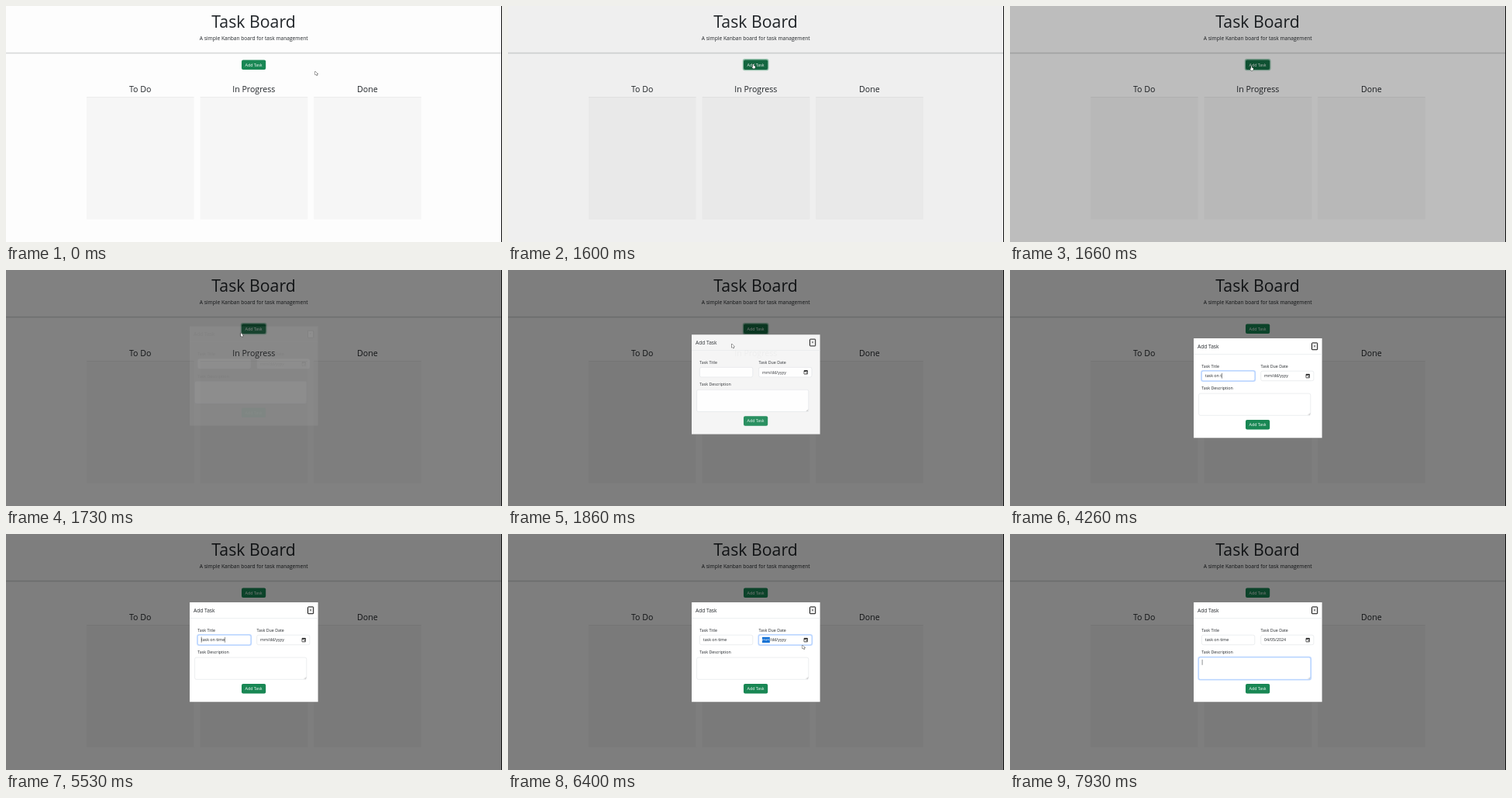
Animation of 640x304 px, one loop 8 s. Source, as an HTML page with a canvas:

```html
<!DOCTYPE html>
<html lang="en">
<head>
<meta charset="utf-8">
<title>Task Board</title>
<style>
  html, body { margin: 0; width: 100%; height: 100%; overflow: hidden; background: #fdfdfd; }
  canvas { display: block; width: 640px; height: 304px; }
</style>
</head>
<body>
<canvas id="stage"></canvas>
<script>
const LOOP = 8000;
const INK = '#212529', GREEN = '#198754', DARK_GREEN = '#146c43', BLUE = '13,110,253';
const BODY = 5.31, LEAD = 6.64, HEADING = 10.62, DISPLAY = 21.25;

const BACKDROP_AT = 1584, MODAL_AT = 1722, BLUR_AT = 2030;
const TITLE_FOCUS = 2500, DATE_FOCUS = 6200, NOTE_FOCUS = 7800;
const TITLE = 'task on time';
const KEY_TIMES = [2800, 2960, 3200, 3330, 3460, 3600, 3800, 4000, 4200, 4460, 4660, 4860];

// time, text, selected segment
const DATE_STEPS = [
  [0, 'mm/dd/yyyy', 0], [7330, '04/dd/yyyy', 1], [7400, '04/00/yyyy', 1],
  [7470, '04/05/yyyy', 2], [7530, '04/05/0002', 2], [7600, '04/05/0020', 2],
  [7660, '04/05/0202', 2], [7730, '04/05/2024', 2]
];

// time, x, y of the pointer tip
const POINTER = [
  [0, 399, 84], [60, 399, 84], [450, 268, 84], [860, 300, 80], [1260, 316, 75], [1610, 316, 75],
  [1730, 303, 81], [2060, 262, 122], [2400, 252, 136], [5530, 252, 136],
  [5840, 418, 130], [6130, 374, 137], [6220, 374, 137], [6400, 380, 143], [LOOP, 380, 143]
];

const canvas = document.getElementById('stage');
const ctx = canvas.getContext('2d');
const ratio = window.devicePixelRatio || 1;
canvas.width = 640 * ratio;
canvas.height = 304 * ratio;

const clamp = v => Math.max(0, Math.min(1, v));
const ramp = (t, start, duration = 150) => clamp((t - start) / duration);
const within = (x, y, [left, top, w, h]) => x >= left && x <= left + w && y >= top && y <= top + h;

function box(x, y, w, h, fill, stroke, radius = 0, lineWidth = 0.4) {
  ctx.beginPath();
  ctx.roundRect(x, y, w, h, radius);
  if (fill) { ctx.fillStyle = fill; ctx.fill(); }
  if (stroke) { ctx.strokeStyle = stroke; ctx.lineWidth = lineWidth; ctx.stroke(); }
}

function setFont(size) {
  ctx.font = `${size}px "Open Sans", sans-serif`;
}

function text(label, x, y, size = BODY, color = INK, align = 'left') {
  setFont(size);
  ctx.textAlign = align;
  ctx.fillStyle = color;
  ctx.fillText(label, x, y);
}

function widthOf(label) {
  setFont(BODY);
  return ctx.measureText(label).width;
}

function button(y, fill = GREEN, ring = 0) {
  if (ring) box(302.7, y - 1.3, 33.8, 15.2, `rgba(60,153,110,${0.5 * ring})`, null, 3);
  box(304, y, 31.2, 12.6, fill, null, 2);
  text('Add Task', 319.6, y + 8.2, BODY, '#fff', 'center');
}

function field(x, y, w, h, focus) {
  if (focus) box(x - 1.3, y - 1.3, w + 2.6, h + 2.6, `rgba(${BLUE},${0.25 * focus})`, null, 3);
  box(x, y, w, h, '#fff', focus > 0.5 ? '#86b7fe' : '#ced4da', 2);
}

function caret(x, y) {
  box(x, y, 0.5, 7, INK);
}

function drawPage(t, hovered) {
  box(0, 0, 640, 304, '#fdfdfd');
  text('Task Board', 319.5, 28.2, DISPLAY, INK, 'center');
  text('A simple Kanban board for task management', 319.7, 43.5, LEAD, INK, 'center');
  box(0, 59.8, 640, 1.6, '#d9dbdb');
  const pressed = t > 1420 && t < BLUR_AT;
  button(69.4, pressed ? DARK_GREEN : hovered ? '#157347' : GREEN,
    ramp(t, 1420) * (1 - ramp(t, BLUR_AT)));
  ['To Do', 'In Progress', 'Done'].forEach((name, i) => {
    const x = 104 + i * 146.6;
    box(x, 117.5, 138.7, 157.3, '#f6f6f6');
    box(x, 117.4, 138.7, 0.6, '#dfdfdf');
    text(name, x + 69.2, 111.3, HEADING, INK, 'center');
  });
}

function drawDate(t, focused) {
  const [, value, selected] = DATE_STEPS.filter(step => step[0] <= t).pop();
  text(value, 328, 138.4);
  if (focused) {
    const parts = value.split('/');
    const before = parts.slice(0, selected).map(part => part + '/').join('');
    const x = 328 + widthOf(before);
    box(x, 132.8, widthOf(parts[selected]), 7.2, '#0b6bd3');
    text(parts[selected], x, 138.4, BODY, '#fff');
  }
  box(382, 134.3, 4.5, 4.6, null, '#111', 0.3, 0.7);
  box(382, 134.3, 4.5, 1.4, '#111');
  box(384.5, 136.8, 1.2, 1.2, '#111');
}

function drawModal(t) {
  const opacity = ramp(t, MODAL_AT);
  if (!opacity) return;
  const slide = ramp(t, MODAL_AT, 300);
  ctx.save();
  ctx.globalAlpha = opacity;
  ctx.translate(0, -16.6 * (1 - slide) ** 2);

  box(237, 88, 165.6, 128.2, '#fff');
  text('Add Task', 242, 100.5, LEAD);
  box(389.5, 93.9, 7.2, 8.8, '#f0f0f0', '#111', 0.6, 1);
  text('×', 393.1, 100.1, BODY, '#111', 'center');
  box(237, 108.3, 165.6, 0.4, '#dee2e6');

  const titleFocus = ramp(t, TITLE_FOCUS) * (1 - ramp(t, DATE_FOCUS));
  const dateFocus = ramp(t, DATE_FOCUS) * (1 - ramp(t, NOTE_FOCUS, 100));
  const noteFocus = ramp(t, NOTE_FOCUS, 100);

  text('Task Title', 247.3, 125.6);
  field(247.4, 130.2, 68.4, 12.5, titleFocus);
  const typed = TITLE.slice(0, KEY_TIMES.filter(time => time <= t).length);
  text(typed, 251.8, 138.4);
  if (t >= TITLE_FOCUS && t < DATE_FOCUS) caret(251.8 + widthOf(typed), 132.8);

  text('Task Due Date', 323.6, 125.6);
  field(323.7, 130.2, 68.2, 12.5, dateFocus);
  drawDate(t, t >= DATE_FOCUS && t < NOTE_FOCUS);

  text('Task Description', 247.3, 154.2);
  field(243.6, 159.1, 144.2, 28.2, noteFocus);
  ctx.beginPath();
  for (const d of [1, 2.4]) {
    ctx.moveTo(387.2 - d, 186.8);
    ctx.lineTo(387.2, 186.8 - d);
  }
  ctx.strokeStyle = '#777';
  ctx.stroke();
  if (t >= NOTE_FOCUS) caret(247.8, 161.8);

  button(193);
  ctx.restore();
}

function pointerAt(t) {
  const i = POINTER.findIndex(p => p[0] > t);
  const [t0, x0, y0] = POINTER[i - 1], [t1, x1, y1] = POINTER[i];
  const u = (t - t0) / (t1 - t0), eased = u * u * (3 - 2 * u);
  return [x0 + (x1 - x0) * eased, y0 + (y1 - y0) * eased];
}

function outline(x, y, points) {
  ctx.beginPath();
  points.forEach(([dx, dy]) => ctx.lineTo(x + dx, y + dy));
  ctx.closePath();
  ctx.lineJoin = 'round';
  ctx.strokeStyle = '#222';
  ctx.lineWidth = 0.8;
  ctx.stroke();
  ctx.fillStyle = '#fff';
  ctx.fill();
}

function drawPointer(t, x, y, overButton) {
  const typing = t >= KEY_TIMES[0] && t < 5530 || t >= 7330;
  if (typing) return;
  const overText = t > MODAL_AT && within(x, y, [247, 130, 69, 13]);
  if (overText) {
    box(x - 0.2, y - 3.6, 0.6, 7.4, '#333');
  } else if (overButton && t < MODAL_AT) {
    outline(x, y, [[0, 0], [0.9, 0], [0.9, 2], [3, 2.6], [3, 4.4], [2.3, 5.6], [0, 5.6], [-1.4, 3.2], [0, 3.4]]);
  } else {
    outline(x, y, [[0, 0], [0, 4.8], [1.1, 3.9], [1.9, 5.6], [2.7, 5.2], [2, 3.6], [3.4, 3.5]]);
  }
}

function draw(t) {
  ctx.setTransform(ratio, 0, 0, ratio, 0, 0);
  const [x, y] = pointerAt(t);
  const overButton = within(x, y, [304, 69.4, 31.2, 12.6]);
  drawPage(t, overButton && t < MODAL_AT);
  box(0, 0, 640, 304, `rgba(0,0,0,${0.5 * ramp(t, BACKDROP_AT)})`);
  drawModal(t);
  box(639, 0, 1, 304, '#111');
  drawPointer(t, x, y, overButton);
}

const start = performance.now();
function tick() {
  draw((performance.now() - start) % LOOP);
  requestAnimationFrame(tick);
}
tick();
</script>
</body>
</html>
```
